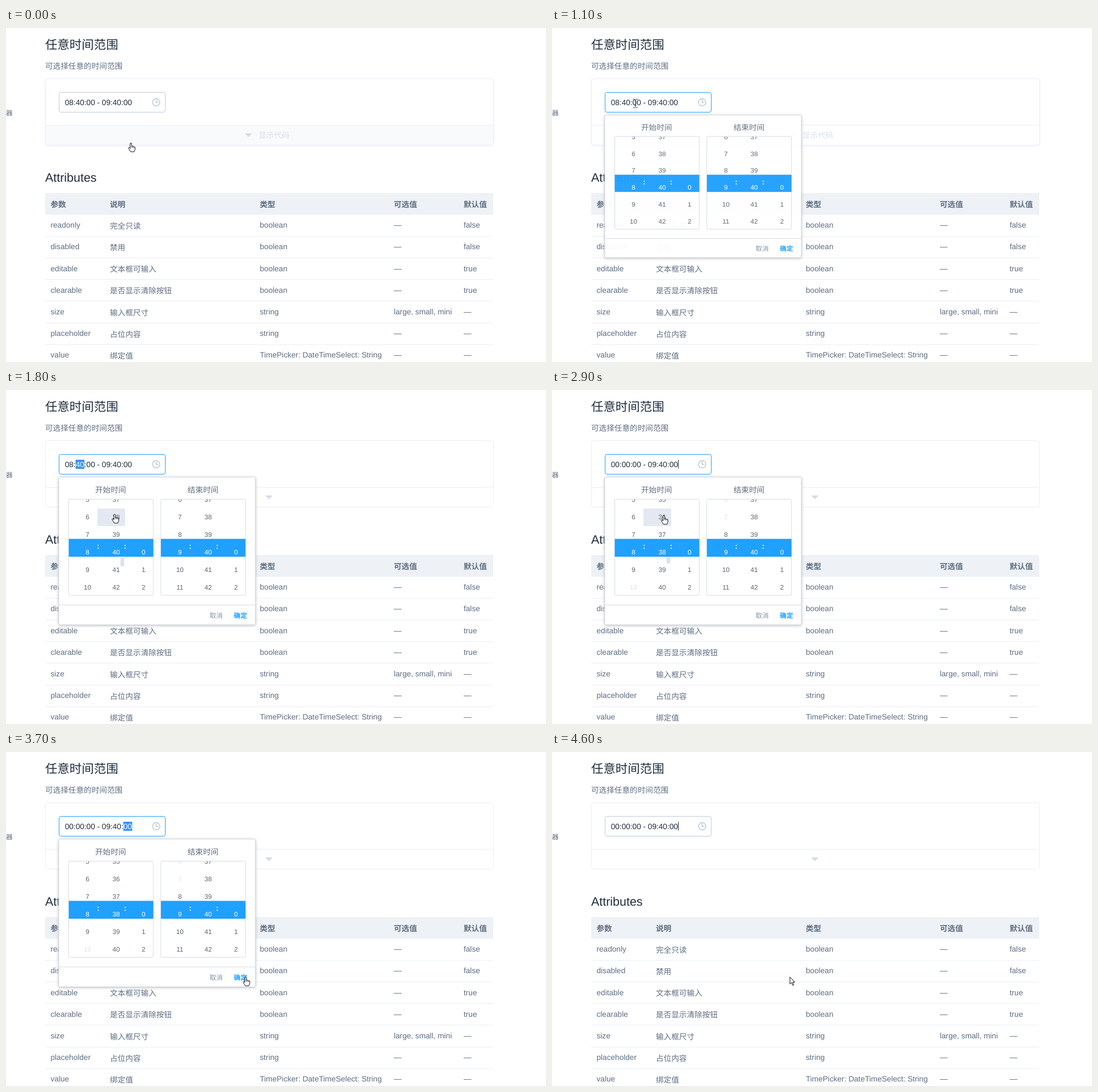
Recreate the animation shown at these times as an HTML page. Size 951 by 589 pixels, loop 5.9 s.

```html
<!DOCTYPE html>
<html lang="zh-CN">
<head>
<meta charset="utf-8">
<title>时间范围</title>
<style>
html, body { margin: 0; width: 100%; height: 100%; overflow: hidden; background: #fff; }
svg { display: block; width: 951px; height: 589px; }
text { font: 13.63px "Liberation Sans", "Noto Sans CJK SC", "Noto Sans CJK", sans-serif; fill: #5e6d82; white-space: pre; text-rendering: geometricPrecision; }
.h { font-size: 21.45px; fill: #1f2d3d; }
.b { font-weight: bold; }
.s { font-size: 11.7px; }
.mid { text-anchor: middle; }
.dark { fill: #1f2d3d; }
.pale { fill: #d6deea; }
.btn { fill: #8391a5; }
.ok { fill: #20a0ff; }
.num { fill: #5a6677; }
.white { fill: #fff; }
.late .dis { fill: #d9e3ee; }
.box { fill: #fff; stroke: #eaeefb; }
.glow { filter: drop-shadow(0 1px 2px rgba(226, 232, 248, .6)); }
#panel { filter: drop-shadow(0 1.5px 2.5px #bbb); }
</style>
</head>
<body>
<svg id="stage" viewBox="0 0 951 589">
  <defs><clipPath id="lists"><rect x="110" y="193" width="313" height="169"/></clipPath></defs>
  <g id="page">
    <rect id="demo" class="box" x="69.5" y="89.5" width="789" height="117" rx="4"/>
    <rect id="bar" x="70" y="172" width="788" height="34" fill="#f9fafc"/>
    <path d="M70 171.5H858" stroke="#eaeefb"/>
    <path id="arrow" d="M-6.5-3H6.5L0 3.5Z" fill="#d3dce8"/>
    <text id="label" class="pale" y="194">显示代码</text>
    <rect id="input" x="93.5" y="113.5" width="187" height="35" rx="3.5" fill="#fff"/>
    <g fill="none" stroke="#bfcbd9" stroke-width="1.6">
      <circle cx="264.5" cy="131" r="6.4"/><path d="M264.5 126.8V131.3H268.4"/>
    </g>
    <text id="value" class="dark" x="103.7" y="135.7"/>
    <g id="mark">
      <rect y="123" width="15.4" height="16" fill="#3390ff"/>
      <text id="marked" class="white" y="135.7"/>
    </g>
    <path id="caret" d="M222.5 123V138.5" stroke="#1f2d3d"/>
    <rect x="69" y="291" width="789" height="38.5" fill="#eef1f6"/>
  </g>
  <g id="popup">
    <rect id="panel" x="93" y="153.7" width="346" height="260.3" rx="2" fill="#fff" stroke="#d3dce6"/>
    <text x="157" y="181">开始时间</text>
    <text x="319.7" y="181">结束时间</text>
    <rect id="cell" x="161" y="209" width="48.8" height="31" fill="#e4e8f1"/>
    <rect id="thumb" x="201.5" width="6.6" height="15" rx="3" fill="#dde3ec"/>
    <g fill="none" stroke="#d3dce6">
      <rect x="110.5" y="192.5" width="148.7" height="169.5" rx="2"/>
      <rect x="272.7" y="192.5" width="149" height="169.5" rx="2"/>
      <path d="M93.5 379H438.5"/>
    </g>
    <g id="wheels" clip-path="url(#lists)"/>
    <text class="s btn" x="358.4" y="401.6">取消</text>
    <text class="s b ok" x="401.2" y="401.6">确定</text>
  </g>
  <circle id="ripple" fill="#22b3cc"/>
  <g id="pointer" stroke-linejoin="round">
    <g id="hand" fill="#fff" stroke="#111">
      <path d="M4 10.5V2a1.3 1.3 0 0 1 2.6 0V7a1.1 1.1 0 0 1 2.2.3a1.1 1.1 0 0 1 2 .5a1 1 0 0 1 1.8.8v3.4l-1.6 4.3H4.8L1 10.2a1.2 1.2 0 0 1 1.8-1.5z"/>
      <path d="M6.6 7V9M8.8 7.3V9.3M10.8 7.8V9.5" stroke-width=".8"/>
    </g>
    <path id="beam" d="M0 .5H3L4 1.5L5 .5H8M4 1.5V14.5M0 15.5H3L4 14.5L5 15.5H8M2.5 11.5H5.5" fill="none" stroke="#3b4652"/>
    <path id="plain" d="M1 .8V13.2L3.9 10.5L5.9 15.6L7.9 14.8L5.8 9.9H9.6Z" fill="#fff" stroke="#111"/>
  </g>
</svg>
<script>
const LOOP = 5900, PITCH = 31.04, EM = 13.63, VALUE_X = 103.7;
const $ = id => document.getElementById(id);

function add(parent, tag, attrs, text = '') {
  const el = document.createElementNS('http://www.w3.org/2000/svg', tag);
  for (const k in attrs) el.setAttribute(k, attrs[k]);
  el.textContent = text;
  parent.append(el);
  return el;
}
const write = (x, y, text, cls = '') => add($('page'), 'text', { x, y, class: cls }, text);
const set = (id, attrs) => { for (const k in attrs) $(id).setAttribute(k, attrs[k]); };
const show = (id, on) => { $(id).style.display = on ? '' : 'none'; };

// Static page
write(69, 36.7, '任意时间范围', 'h');
write(69, 71.6, '可选择任意的时间范围');
write(0, 154.3, '器', 's');
write(69, 271, 'Attributes', 'h');
const COLS = [78.5, 183, 447, 683, 806];
['参数', '说明', '类型', '可选值', '默认值'].forEach((s, i) => write(COLS[i], 316.3, s, 'b'));
[
  ['readonly', '完全只读', 'boolean', '—', 'false'],
  ['disabled', '禁用', 'boolean', '—', 'false'],
  ['editable', '文本框可输入', 'boolean', '—', 'true'],
  ['clearable', '是否显示清除按钮', 'boolean', '—', 'true'],
  ['size', '输入框尺寸', 'string', 'large, small, mini', '—'],
  ['placeholder', '占位内容', 'string', '—', '—'],
  ['value', '绑定值', 'TimePicker: DateTimeSelect: String', '—', '—']
].forEach((row, r) => {
  const y = 352.2 + r * 38.15;
  row.forEach((s, i) => write(COLS[i], i === 1 ? y + 1.8 : y, s));
  add($('page'), 'path', { d: `M69 ${Math.round(367 + r * 38.15) + .5}H858`, stroke: '#e9eef6' });
});

// Time wheels
function wheel(x, from, to, disabled = () => false) {
  const items = [];
  for (let v = from; v <= to; v++) {
    const cls = 's mid num' + (disabled(v) ? ' dis' : '');
    items.push({ v, el: add($('wheels'), 'text', { x, class: cls }, v) });
  }
  return centre => items.forEach(({ v, el }) => {
    el.setAttribute('y', 290.2 + (v - centre) * PITCH);
    el.classList.toggle('white', v === Math.round(centre));
  });
}
for (const x of [110.5, 272.8]) {
  add($('wheels'), 'rect', { x, y: 262.5, width: 149, height: 31.5, fill: '#20a0ff' });
  for (const dx of [51.8, 99.3]) add($('wheels'), 'text', { x: x + dx, y: 280.4, class: 'mid b white' }, ':');
}
wheel(143.5, 4, 12, v => v > 9)(8);
const minutes = wheel(194, 34, 44);
wheel(242.3, 0, 4)(0);
wheel(306.3, 5, 13, v => v < 8)(9);
wheel(356, 36, 44)(40);
wheel(405, 0, 4)(0);

// Held values: [start ms, ...values]
const TRACKS = {
  pointer: [[0, 'hand', 214.7, 202], [100, 'hand', 211, 198], [200, 'hand', 198, 185], [300, 'plain', 180, 164],
    [400, 'beam', 160, 143], [500, 'beam', 148, 129], [600, 'beam', 143, 125], [1500, 'beam', 150, 134],
    [1600, 'plain', 167, 172], [1700, 'hand', 182, 207], [1800, 'hand', 186, 218.5], [2900, 'hand', 191.5, 220.5],
    [3000, 'hand', 203, 234], [3100, 'plain', 262, 290], [3200, 'hand', 333, 338], [3300, 'hand', 393, 362],
    [3400, 'hand', 427, 394], [3500, 'hand', 424, 395], [3600, 'hand', 419, 395], [3700, 'hand', 416.7, 396],
    [4600, 'plain', 418, 396]],
  label: [[0, 445, 427, 1], [700, 441, 424, 1], [1500, 446, 440, .6], [1600, 450, 453, .3], [1700, 453, 460, 0], [1800, 453, 463, 0]],
  border: [[0, '#c0ccda'], [400, '#8391a5'], [1000, '#20a0ff'], [4300, '#c0ccda']],
  popup: [[0, 0], [1000, .5], [1100, .965], [1200, .99], [1300, 1], [4100, .5], [4200, .08], [4300, 0]],
  minutes: [[0, 40], [2000, 39.3], [2100, 38.3], [2200, 38]],
  mark: [[0, -1], [1700, 3], [2000, -1], [3200, 14], [3300, 17], [4000, -1]],
  ripple: [[0, 0, 0, 0, 0], [900, 146.5, 133, 9.5, .6], [1000, 146.5, 133, 11, .25], [1100, 0, 0, 0, 0],
    [4000, 421.5, 397.5, 9.5, .6], [4100, 421.5, 397.5, 11, .25], [4200, 0, 0, 0, 0]]
};
const at = (name, t) => TRACKS[name].findLast(k => k[0] <= t).slice(1);
const widthOf = s => [...s].reduce((w, c) => w + (c === '-' ? .333 : c >= '0' && c <= '9' ? .556 : .278), 0) * EM;

function render(t) {
  const late = t >= 2000;
  const value = (late ? '00:00:00' : '08:40:00') + ' - 09:40:00';
  $('stage').classList.toggle('late', late);
  $('demo').classList.toggle('glow', t < 1800);
  show('bar', t < 300);
  $('value').textContent = value;

  const [labelX, arrowX, fade] = at('label', t);
  set('label', { x: labelX, opacity: fade });
  set('arrow', { transform: `translate(${arrowX} 189)` });
  set('input', { stroke: at('border', t)[0] });

  const [from] = at('mark', t);
  show('mark', from >= 0);
  show('caret', late && from < 0);
  if (from >= 0) {
    set('mark', { transform: `translate(${VALUE_X + widthOf(value.slice(0, from))} 0)` });
    $('marked').textContent = value.slice(from, from + 2);
  }

  const [open] = at('popup', t);
  show('popup', open > 0);
  set('popup', { opacity: open, transform: `translate(0 154) scale(1 ${open}) translate(0 -154)` });
  const [centre] = at('minutes', t);
  minutes(centre);
  const hover = t >= 1800 && t < 3100;
  show('cell', hover);
  show('thumb', hover);
  set('thumb', { y: 296 - (40 - centre) * 2.4 });

  const [cx, cy, r, opacity] = at('ripple', t);
  set('ripple', { cx, cy, r, opacity });
  const [shape, x, y] = at('pointer', t);
  for (const id of ['hand', 'beam', 'plain']) show(id, id === shape);
  set('pointer', { transform: `translate(${x} ${y})` });
}

function tick() {
  render(performance.now() % LOOP);
  requestAnimationFrame(tick);
}
tick();
</script>
</body>
</html>
```
